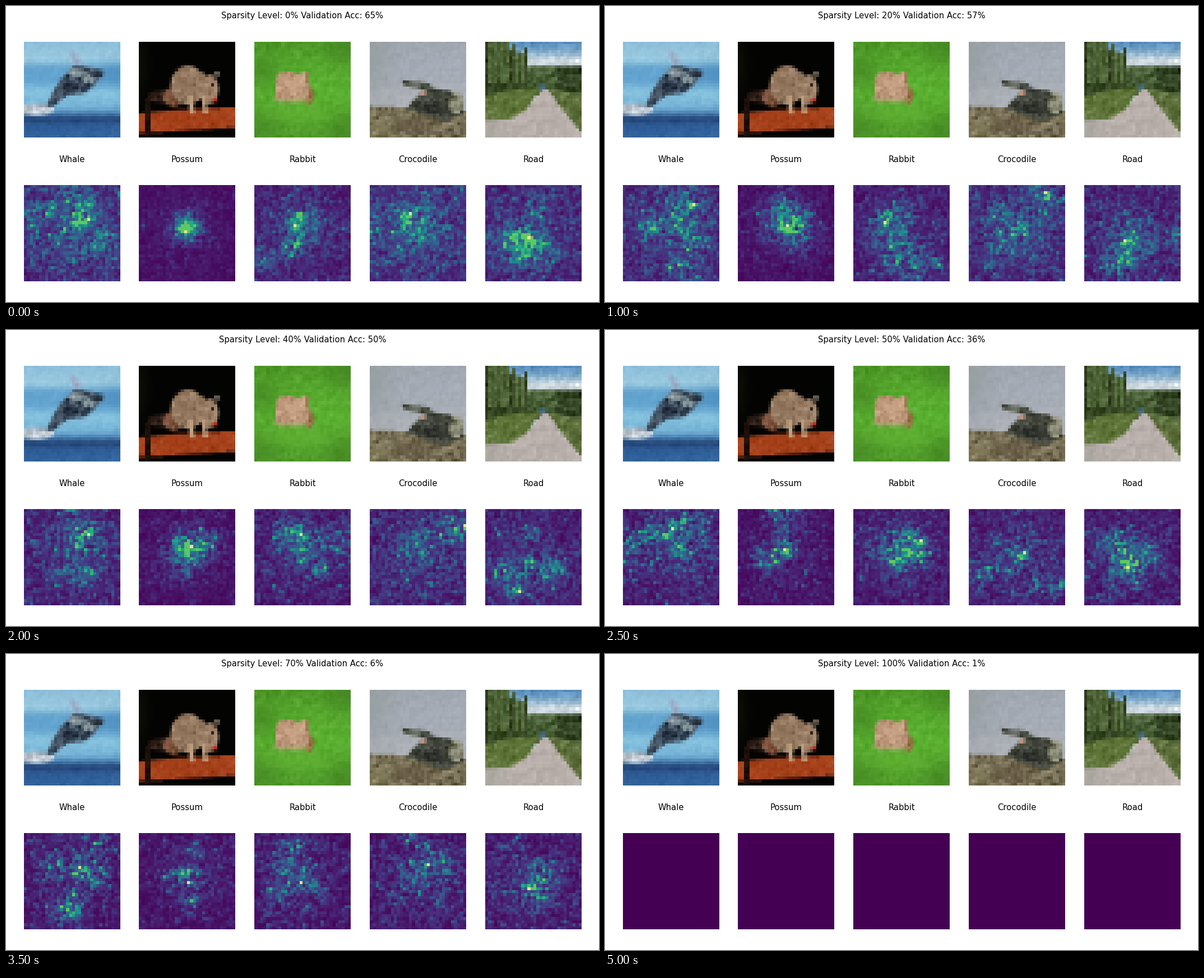
A matplotlib script for the animation above (5500 ms loop, 1058x529 px).

```python
import numpy as np
import matplotlib.pyplot as plt
from matplotlib.animation import FuncAnimation
from matplotlib.path import Path

W, H = 1058, 529
N, FINE = 32, 4                  # cells per picture side, samples per cell
STEPS = 11
ACCURACY = [65, 61, 57, 55, 50, 36, 13, 6, 3, 1, 1]

ticks = (np.arange(N * FINE) + 0.5) / FINE
GX, GY = np.meshgrid(ticks, ticks)
POINTS = np.column_stack([GX.ravel(), GY.ravel()])


class Picture:
    """A 32 x 32 picture built from flat, lightly grained shapes."""

    def __init__(self, seed, stops, rough=3):
        self.rng = np.random.default_rng(seed)
        rows, colors = zip(*stops)
        grad = [np.interp(GY, rows, channel) for channel in np.transpose(colors)]
        self.img = np.stack(grad, axis=-1) + rough * self.grain()

    def grain(self):
        n = self.rng.normal(0, 1, (N, N))
        n = (n + 0.5 * np.roll(n, 1, 0) + 0.5 * np.roll(n, 1, 1)) / 1.22
        return np.kron(n, np.ones((FINE, FINE)))[..., None]

    def fill(self, inside, color, rough):
        shade = np.array(color) + rough * self.grain()
        self.img[inside] = shade[inside]

    def poly(self, color, points, rough=8):
        self.fill(Path(points).contains_points(POINTS).reshape(GX.shape), color, rough)

    def box(self, color, x0, y0, x1, y1, rough=6):
        self.fill((GX >= x0) & (GX < x1) & (GY >= y0) & (GY < y1), color, rough)

    def oval(self, color, x, y, rx, ry, rough=10):
        self.fill(((GX - x) / rx) ** 2 + ((GY - y) / ry) ** 2 < 1, color, rough)

    def glow(self, color, x, y, rx, ry):
        k = 0.6 * np.exp(-((GX - x) / rx) ** 2 - ((GY - y) / ry) ** 2)
        self.img += k[..., None] * (np.array(color) - self.img)

    def pixels(self):
        small = self.img.reshape(N, FINE, N, FINE, 3).mean(axis=(1, 3))
        return np.clip(small, 0, 255).astype(np.uint8)


def whale():
    p = Picture(1, [(0, (140, 190, 218)), (6, (155, 203, 224)), (9, (100, 165, 208)),
                    (13, (98, 163, 207)), (17, (135, 195, 222)), (22, (118, 180, 216)),
                    (24, (72, 125, 175)), (26, (34, 66, 115)), (28, (45, 92, 150)),
                    (32, (52, 102, 158))])
    p.glow((70, 135, 185), 31, 11, 6, 4)
    p.oval((195, 205, 215), 4, 22.7, 6, 2, 16)
    p.poly((150, 172, 198), [(15, 3), (16, 3), (19.5, 6), (18, 8.5), (16.5, 8)])
    p.poly((68, 84, 100), [(12, 13), (16, 8.6), (18, 7.8), (26.8, 9.9), (24, 14),
                           (20.5, 17.2), (14.5, 18), (9.3, 22), (7.4, 22), (9.5, 17)], 18)
    p.oval((148, 163, 168), 17.5, 10.5, 3, 1.2, 18)
    p.oval((128, 146, 152), 21.5, 12.5, 2, 1.6, 20)
    p.oval((40, 50, 64), 24.3, 11.3, 2, 1, 8)
    p.oval((42, 52, 68), 15.5, 15, 3, 1.3, 10)
    return p.pixels()


def possum():
    p = Picture(2, [(0, (3, 3, 2)), (32, (3, 3, 2))], 0)
    p.glow((20, 22, 10), 0, 8, 3, 10)
    p.poly((165, 66, 28), [(0, 24), (12, 22.8), (32, 21.9), (32, 28.7), (0, 30.6)], 6)
    p.box((28, 14, 8), 2, 19, 4, 32, 4)
    p.oval((45, 30, 23), 7, 18.5, 4, 2)
    p.oval((115, 72, 50), 11.5, 18.5, 3.5, 3.2, 14)
    p.oval((148, 121, 96), 16.3, 14.6, 5.7, 6.5)
    p.oval((155, 126, 102), 23.5, 16, 2.9, 4.9)
    p.box((148, 121, 96), 19, 10.5, 22, 18.5)
    p.box((95, 88, 75), 25, 10, 27, 11.8)
    for x, top in ((16.2, 18), (20.6, 18)):
        p.poly((192, 162, 130), [(x, top), (x + 1.5, top), (x + 2.3, 24), (x + 0.9, 24)])
    p.box((50, 36, 28), 24, 14, 25, 15, 2)
    p.box((185, 48, 28), 24.4, 19, 26, 20.2, 2)
    return p.pixels()


def rabbit():
    p = Picture(3, [(0, (76, 150, 38)), (8, (86, 168, 45)), (18, (90, 176, 48)),
                    (32, (80, 155, 42))], 5)
    for x, y in ((30, 30), (2, 28), (31, 2), (2, 10)):
        p.glow((66, 130, 34), x, y, 7, 6)
    p.glow((102, 182, 55), 14, 24, 12, 3)
    p.box((145, 172, 92), 8, 19.4, 16, 20.4)
    p.oval((145, 115, 68), 18.2, 18, 1.8, 3)
    p.poly((192, 154, 124), [(6.8, 19.5), (7.2, 12), (9, 10.2), (12.5, 10), (14, 11),
                             (17.8, 10), (18.3, 15), (17.8, 19.6)], 11)
    p.box((155, 122, 82), 17, 10, 18, 14)
    return p.pixels()


def crocodile():
    p = Picture(4, [(0, (160, 167, 175)), (8, (164, 171, 182)), (20, (173, 177, 183)),
                    (32, (170, 172, 170))])
    p.glow((146, 154, 154), 1, 6, 7, 12)
    p.poly((120, 112, 86), [(0, 21.6), (12, 22), (17, 23.4), (32, 23), (32, 32), (0, 32)], 18)
    p.glow((95, 80, 62), 14, 28, 8, 3)
    p.glow((140, 136, 98), 3, 29, 5, 3)
    p.poly((66, 70, 60), [(16, 18), (20, 15.6), (26.5, 16.4), (31, 19), (31, 24),
                          (24.4, 26.8), (12.3, 22.3)], 13)
    p.oval((135, 136, 115), 28.7, 20.5, 2.4, 3.6, 15)
    p.oval((46, 48, 43), 21, 22, 3.5, 2.2)
    p.poly((80, 85, 74), [(10.6, 12.8), (20, 14), (20.8, 16), (18, 16.2), (11.3, 14.7)], 14)
    p.box((186, 138, 116), 17, 16.6, 18.5, 18)
    return p.pixels()


def road():
    p = Picture(5, [(0, (82, 138, 190)), (4, (140, 180, 208)), (6, (200, 212, 218)),
                    (32, (195, 207, 212))], 8)
    p.box((70, 92, 52), 0, 8.2, 32, 18, 12)
    p.box((48, 66, 34), 24, 8.2, 32, 17, 10)
    for x in np.arange(14):
        top = 0 if x < 8 else p.rng.uniform(0, 4)
        shade = np.array((66, 84, 46)) * p.rng.uniform(0.7, 1.4)
        p.box(shade, x, top, x + 1, 17, 10)
    p.box((52, 70, 34), 0, 14, 14, 19, 8)
    p.poly((94, 116, 56), [(0, 18.5), (9, 16), (18, 15.5), (15, 21), (10, 26), (0, 26.5)])
    p.poly((92, 110, 58), [(21, 15.5), (32, 18), (32, 31), (26, 24)], 10)
    p.poly((184, 175, 170), [(18.9, 16), (20.8, 16), (24, 20.5), (32, 30.5), (32, 32),
                             (0, 32), (0, 26.4), (9, 25.8), (15, 21.6)], 5)
    p.glow((160, 160, 152), 0, 30, 6, 4)
    p.box((58, 104, 150), 18, 14.6, 20, 15.8)
    p.box((250, 250, 250), 30, 6, 31, 7, 0)
    return p.pixels()


# name, painter, focus of the heat map, its spread and its level
SUBJECTS = [("Whale", whale, (17, 12), 7, 0.27),
            ("Possum", possum, (16, 13), 2, 0.08),
            ("Rabbit", rabbit, (15, 15), 5, 0.18),
            ("Crocodile", crocodile, (16, 15), 8, 0.25),
            ("Road", road, (14, 18), 7, 0.22)]


def saliency(step, k):
    """Speckle around a focus; it scatters and fades as the step rises."""
    if step >= 9:
        return np.zeros((N, N))
    (fx, fy), spread, level = SUBJECTS[k][2:]
    rng = np.random.default_rng(50 * step + k)
    y, x = np.mgrid[:N, :N]

    def bump(cx, cy, r):
        return np.exp(-((x - cx) ** 2 + (y - cy) ** 2) / (2 * r * r))

    level = 0.12 + (level - 0.12) * (1 - step / 9)
    env = level * (0.5 + 0.6 * bump(fx, fy, 9)) + 0.18 * bump(fx, fy, 2)
    for _ in range(5):
        cx, cy = rng.normal((fx, fy), spread + 0.4 * step)
        env += 0.16 * bump(cx, cy, rng.uniform(1.5, 4))
    shape = 2.8 - 0.15 * step
    noise = rng.gamma(shape, 1 / shape, (N, N))
    noise = 0.7 * noise + 0.15 * np.roll(noise, 1, 0) + 0.15 * np.roll(noise, 1, 1)
    values = env * noise
    peak = values.argmax()
    values = np.minimum(values, 0.75)
    values.flat[peak] = 2
    return values


plt.rcParams["font.family"] = "DejaVu Sans"
fig = plt.figure(figsize=(12, 6), dpi=H / 6, facecolor="white")
title = fig.suptitle("", fontsize=12, y=0.98 + 1 / H)
cmap = plt.get_cmap("viridis").with_extremes(over="#ebe09a")
SIDE, PITCH, LEFT = 171.6, 205.85, 31.6


def panel(k, top, data, **style):
    ax = fig.add_axes([(LEFT + PITCH * k) / W, 1 - (top + SIDE) / H, SIDE / W, SIDE / H])
    ax.axis("off")
    return ax.imshow(data, interpolation="nearest", aspect="auto", **style)


maps = []
for k, (name, paint, *_) in enumerate(SUBJECTS):
    panel(k, 63.7, paint())
    maps.append(panel(k, 320.1, np.zeros((N, N)), cmap=cmap, vmin=0, vmax=1))
    fig.text((LEFT + PITCH * k + SIDE / 2) / W, 1 - 279 / H, name,
             ha="center", va="baseline", fontsize=12)

fields = [[saliency(step, k) for k in range(len(SUBJECTS))] for step in range(STEPS)]


def update(step):
    title.set_text(f"Sparsity Level: {10 * step}% Validation Acc: {ACCURACY[step]}%")
    for image, values in zip(maps, fields[step]):
        image.set_data(values)
    return [title, *maps]


anim = FuncAnimation(fig, update, frames=STEPS, interval=500, repeat=True,
                     repeat_delay=0, blit=False)
plt.show()
```
